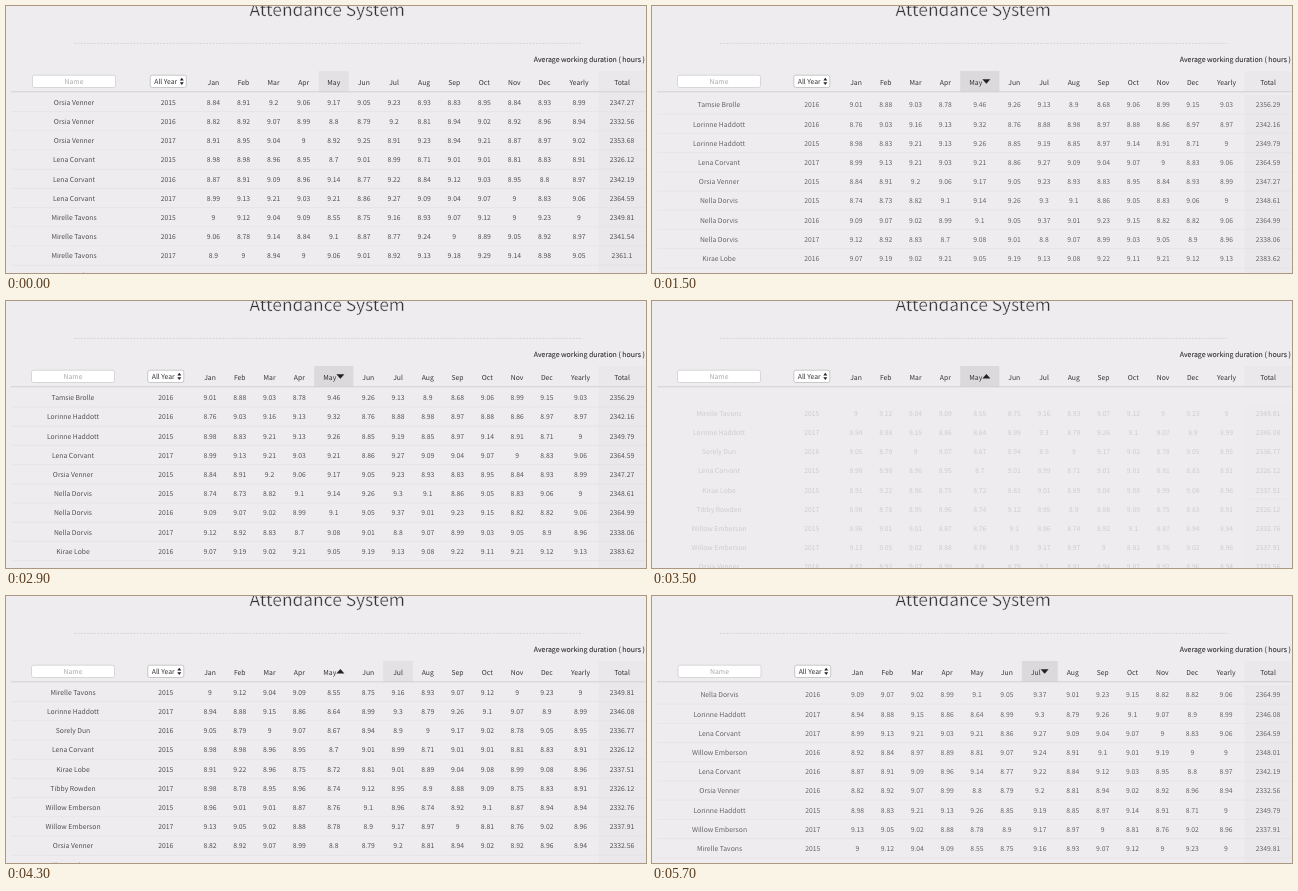
An HTML page that plays this animation: 640x267 px, repeating every 5800 ms.

```html
<!DOCTYPE html>
<html lang="en">
<head>
<meta charset="utf-8">
<title>Attendance System</title>
<style>
  html, body { margin: 0; width: 100%; height: 100%; overflow: hidden; background: #eeecef; }
  svg { display: block; width: 640px; height: 267px; }
  text {
    font-family: "Noto Sans CJK JP", "Noto Sans CJK SC", "Noto Sans CJK", "Open Sans", sans-serif;
    font-size: 6.8px; fill: #333; text-anchor: middle; text-rendering: geometricPrecision;
  }
  /* a background-coloured outline thins the heading to a light weight */
  .title { font-size: 17.4px; font-weight: 300; stroke: #eeecef; stroke-width: .4px; }
  .caption { font-size: 6.96px; text-anchor: end; stroke: #333; stroke-width: .1px; }
  .left { text-anchor: start; }
  .hint { fill: #aaa; font-weight: 300; }
  #rows text { fill: #505050; font-weight: 300; }
</style>
</head>
<body>
<svg viewBox="0 0 640 267" xmlns="http://www.w3.org/2000/svg">
  <rect width="640" height="267" fill="#eeecef"/>
  <text class="title" x="321.2" y="10.3">Attendance System</text>
  <path d="M68 37.4H576.5" stroke="#d0ced1" stroke-width=".8" stroke-dasharray="2 1.3"/>
  <text class="caption" x="638.8" y="56.4">Average working duration ( hours )</text>
  <g id="rows"></g>
  <g id="head"></g>
</svg>
<script>
const LOOP = 5800, STEP = 100, PITCH = 19.2, DROP = 20;
const MAY = 4, JUL = 6, WORKDAYS = 261;
const months = 'Jan Feb Mar Apr May Jun Jul Aug Sep Oct Nov Dec'.split(' ');

const people = {
  A: 'Orsia Venner', D: 'Lena Corvant', J: 'Mirelle Tavons', K: 'Tamsie Brolle',
  P: 'Lorinne Haddott', G: 'Nella Dorvis', M: 'Kirae Lobe', Y: 'Sorely Dun',
  L: 'Tibby Rowden', S: 'Willow Emberson'
};

// Column layouts: the sorted month is wider by `extra`
const plain = { name: 68, year: 162.3, first: 207.4, step: 30.1, sorted: -1, extra: 0, yearly: 573 };
const byMay = { name: 67, year: 159.8, first: 204, step: 29.77, sorted: MAY, extra: 9.4, yearly: 574.5 };
const byJul = { name: 67.5, year: 160.7, first: 205.5, step: 29.87, sorted: JUL, extra: 6.2, yearly: 574 };

// Row keys: person + last digit of the year; from/to bound the sorted column
const views = [
  { cols: plain, order: 'A5 A6 A7 D5 D6 D7 J5 J6 J7 M5' },
  { cols: byMay, order: 'K6 P6 P5 D7 A5 G5 G6 G7 M6', from: 9.46, to: 9.05 },
  { cols: byMay, order: 'J5 P7 Y6 D5 M5 L7 S5 S7 A6 S6', from: 8.55, to: 8.81, up: true },
  { cols: byJul, order: 'G6 P7 D7 S6 D6 A6 P5 S7 J5', from: 9.37, to: 9.16 }
];
for (const v of views) v.order = v.order.split(' ');
const clicks = [500, 2900, 4700];

function random(seed) {
  return () => (seed = (seed * 16807) % 2147483647) / 2147483647;
}

// Monthly hours scatter around nine
const hours = {};
const rnd = random(20157);
for (const key of new Set(views.flatMap(v => v.order)))
  hours[key] = months.map(() => 9 + (rnd() + rnd() - 1) * .36);

// Sorted columns run steeply at first, then level out
for (const { cols, order, from, to } of views.slice(1))
  order.forEach((key, r) =>
    hours[key][cols.sorted] = from + (to - from) * Math.sqrt(r / (order.length - 1)));

const short = x => String(+x.toFixed(2));
function cells(key) {
  const mean = hours[key].reduce((a, b) => a + b) / 12;
  return [people[key[0]], '201' + key[1], ...hours[key].map(short), short(mean), short(mean * WORKDAYS)];
}

const text = (x, y, s, cls = '') => `<text class="${cls}" x="${x.toFixed(2)}" y="${y.toFixed(2)}">${s}</text>`;
const rect = (x, y, w, h, fill, more = '') =>
  `<rect x="${x}" y="${y}" width="${w}" height="${h}" fill="${fill}" ${more}/>`;
const line = (y, color, w) => `<path d="M5 ${y.toFixed(2)}H639.5" stroke="${color}" stroke-width="${w}"/>`;
const tri = (x, y, w, h) => `<path d="M${x - w / 2} ${y}h${w}l${-w / 2} ${h}z" fill="#222"/>`;

function bezier(x1, y1, x2, y2) {
  const at = (a, b, u) => 3 * a * u * (1 - u) ** 2 + 3 * b * u * u * (1 - u) + u ** 3;
  return x => {
    if (x <= 0) return 0;
    if (x >= 1) return 1;
    let lo = 0, hi = 1;
    for (let i = 0; i < 24; i++) {
      const mid = (lo + hi) / 2;
      if (at(x1, x2, mid) < x) lo = mid; else hi = mid;
    }
    return at(y1, y2, lo);
  };
}
const ease = bezier(.25, .1, .25, 1);
const easeInOut = bezier(.42, 0, .58, 1);

const monthX = (c, i) =>
  c.first + c.step * i + (c.sorted < 0 || i < c.sorted ? 0 : i === c.sorted ? c.extra / 2 : c.extra);

function drawHead({ cols: c, up }, hover, pressed) {
  const w = c.step + (hover === c.sorted ? c.extra : 0);
  const left = c.year - 18;
  let s = rect(592.5, 65, 47, 21, '#eae8eb') +
    rect(monthX(c, hover) - w / 2, 65, w, 21, pressed ? '#dbd9dc' : '#e3e1e4') +
    line(85.8, '#cfcdd0', .9) +
    rect(c.name - 41.5, 69.2, 83, 12.3, '#fff', 'rx="2" stroke="#cbc9cc" stroke-width=".7"') +
    text(c.name, 78, 'Name', 'hint') +
    rect(left, 69.2, 36, 12.3, '#fff', 'rx="2" stroke="#b5b3b6" stroke-width=".7"') +
    text(left + 4, 78, 'All Year', 'left') +
    tri(left + 31.5, 74.6, 4, -2.8) + tri(left + 31.5, 76.3, 4, 2.8);
  months.forEach((m, i) => {
    const x = monthX(c, i);
    if (i !== c.sorted) return s += text(x, 78.5, m);
    const arrow = x + (i === MAY ? 6.6 : 4.8);
    s += text(x - 4, 78.5, m) + (up ? tri(arrow, 77.5, 8, -4.5) : tri(arrow, 73.2, 8, 4.5));
  });
  return s + text(c.yearly, 78.5, 'Yearly') + text(616, 78.5, 'Total');
}

function drawRows({ cols: c, order }) {
  const xs = [c.name, c.year, ...months.map((_, i) => monthX(c, i)), c.yearly, 616];
  let s = rect(592.5, 86, 47, 200, '#eae8eb');
  order.forEach((key, r) => {
    const y = 98.8 + PITCH * r;
    s += cells(key).map((cell, i) => text(xs[i], y, cell)).join('') + line(y + 6.8, '#e2e0e3', .6);
  });
  return s;
}

const head = document.getElementById('head');
const rows = document.getElementById('rows');
let shown = -1, lastView = -1;

function render(t) {
  const k = clicks.filter(c => c <= t).length;
  const since = k ? t - clicks[k - 1] : 0;
  const leaving = k > 0 && since < 400;
  const v = leaving ? k - 1 : k;
  const p = !k ? 1 : leaving ? 1 - easeInOut((since + 50) / 500) : ease((since - 450) / 950);
  const hover = t < 4200 ? MAY : JUL;
  const pressed = t >= 500 && t < 4200 || t >= 4700;

  head.innerHTML = drawHead(views[v], hover, pressed);
  if (v !== lastView) rows.innerHTML = drawRows(views[v]);
  lastView = v;
  rows.setAttribute('opacity', p.toFixed(3));
  rows.setAttribute('transform', `translate(0 ${(DROP * (1 - p)).toFixed(2)})`);
}

const start = performance.now();
function tick() {
  const t = Math.floor((performance.now() - start) % LOOP / STEP) * STEP;
  if (t !== shown) render(shown = t);
  requestAnimationFrame(tick);
}
tick();
</script>
</body>
</html>
```
